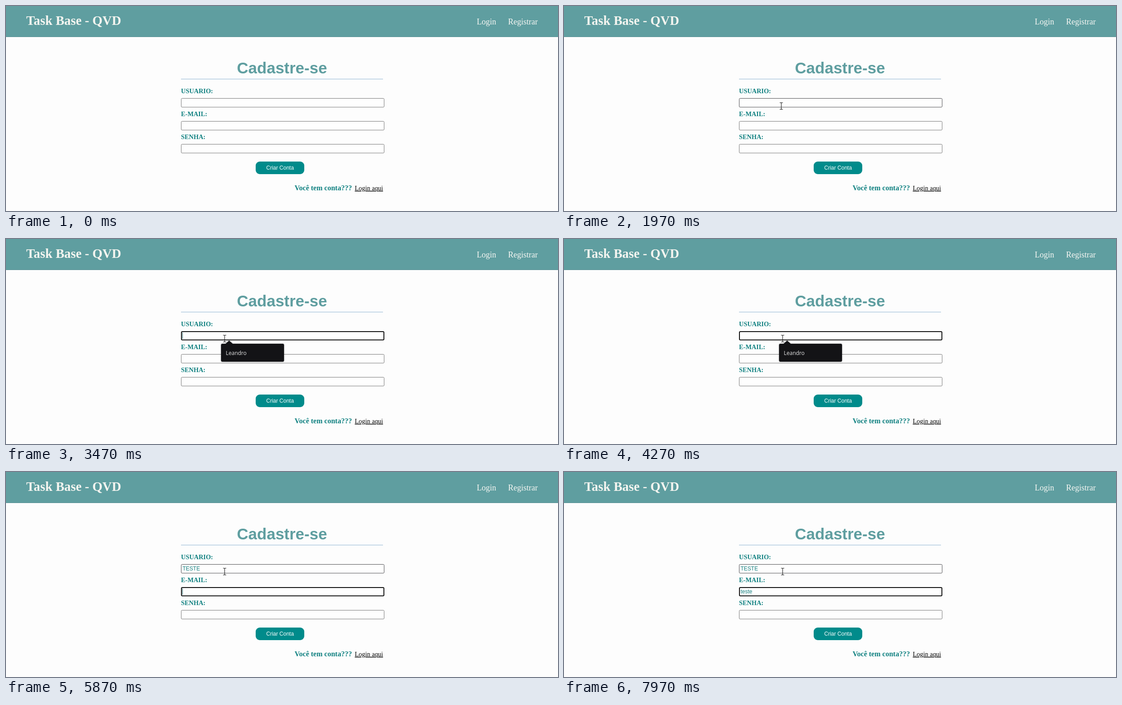
An HTML page that plays this animation: 1227 by 456 pixels, repeating every 8000 ms.

```html
<!DOCTYPE html>
<html lang="pt-BR">
<head>
<meta charset="utf-8">
<title>Cadastre-se</title>
<style>
  html, body { margin: 0; width: 100%; height: 100%; overflow: hidden; background: #fdfdfd; }
  svg { display: block; width: 1227px; height: 456px; }
  text { font-family: "Liberation Serif", "Times New Roman", serif; white-space: pre; }
  .sans { font-family: "Liberation Sans", Arial, sans-serif; }
  .bold { font-weight: bold; }
  .nav { font-size: 18px; fill: #f8f8f4; }
  .label { font-size: 14.4px; fill: #0f8080; }
  .value { font-size: 12px; fill: #178080; }
  .field { fill: #fefefe; }
</style>
</head>
<body>
<svg viewBox="0 0 1227 456">
  <rect width="1227" height="69" fill="#5f9ea0"/>
  <rect y="68" width="1227" height="1" fill="#548e92"/>
  <text class="bold" x="45" y="42" font-size="28.8" fill="#f5f5f0">Task Base - QVD</text>
  <text class="nav" x="1046.5" y="41">Login</text>
  <text class="nav" x="1116" y="41">Registrar</text>

  <text class="sans bold" x="613.5" y="150" font-size="35" fill="#5f9ea0" text-anchor="middle">Cadastre-se</text>
  <rect x="389" y="162" width="449" height="1" fill="#8fb4d2"/>
  <g id="form"></g>

  <rect x="555" y="346" width="108" height="28" rx="9" fill="#008b8b"/>
  <text class="sans" x="578.5" y="364" font-size="12" fill="#fff">Criar Conta</text>
  <text class="bold" x="641.5" y="410" font-size="16" fill="#0f8080">Você tem conta???</text>
  <text x="775.3" y="410" font-size="14.4" text-decoration="underline">Login aqui</text>

  <g id="tip">
    <path d="M481 233H488L496 226L504 233H615Q618 233 618 236V270Q618 273 615 273H481Q478 273 478 270V236Q478 233 481 233Z"
      fill="#131316" style="filter:drop-shadow(0 0 1.5px #0006)"/>
    <text x="488.5" y="258" font-size="12" fill="#e4e4e4" style="font-family:'Open Sans','Noto Sans',sans-serif">Leandro</text>
  </g>

  <g id="hand" fill="#fff" stroke="#111" stroke-width="1.1" stroke-linejoin="round">
    <path d="M-2 10.5V-8Q-2 -10 -.5 -10T1 -8V-2Q3.5 -3.5 4 -1Q6 -2 6.7 .2Q9 -.5 9 2V5Q9 8 7 10.5H-2L-7 3.5Q-8 1 -6 1Q-4.5 1 -2 4Z"/>
    <path d="M1 -2V2M4 -1V2M6.7 .2V3" fill="none"/>
  </g>
  <path id="arrow" d="M0 0V16L3.7 12.5L6.2 18L8.8 16.9L6.4 11.5H11.4Z" fill="#fff" stroke="#111"/>
  <path id="beam" d="M-3.5 -7.5H-1L0 -6.5L1 -7.5H3.5M0 -6.5V6.5M-3.5 7.5H-1L0 6.5L1 7.5H3.5" fill="none" stroke="#111" stroke-width="1.1"/>
</svg>
<script>
const LOOP = 8000;
const $ = id => document.getElementById(id);
const clamp = v => Math.max(0, Math.min(1, v));

// focus: [start, end]; keys: time of each typed character
const fields = [
  { label: 'USUARIO:', text: 'TESTE', focus: [2300, 5600], keys: [4410, 4560, 4690, 4810, 4950] },
  { label: 'E-MAIL:', text: 'teste', focus: [5600, LOOP], keys: [6720, 6870, 7000, 7130, 7280] },
  { label: 'SENHA:', text: '', focus: [LOOP, LOOP], keys: [] }
];

$('form').innerHTML = fields.map((f, i) => `
  <g transform="translate(0 ${i * 51})">
    <text class="label bold" x="389" y="194">${f.label}</text>
    <rect class="field" rx="2"/>
    <text class="value sans" x="392.5" y="219"></text>
    <rect class="caret" y="208" width="1" height="14" fill="#28686c"/>
  </g>`).join('');

fields.forEach((f, i) => {
  const row = $('form').children[i];
  f.box = row.querySelector('.field');
  f.value = row.querySelector('.value');
  f.caret = row.querySelector('.caret');
});

// pointer path: time, x, y
const path = [[30, 1148, 37], [560, 1148, 37], [830, 730, 46], [1100, 560, 150],
  [1450, 483, 222.5], [2050, 483, 222.5], [2200, 486, 221.5], [LOOP, 486, 221.5]];

function pointerAt(t) {
  const n = Math.max(1, path.findIndex(p => p[0] > t));
  const [a, b] = [path[n - 1], path[n]];
  const k = clamp((t - a[0]) / (b[0] - a[0]));
  return [1, 2].map(j => a[j] + (b[j] - a[j]) * k);
}

function set(el, attrs) {
  for (const name in attrs) el.setAttribute(name, attrs[name]);
}

function drawField(f, t, hover) {
  const focused = t >= f.focus[0] && t < f.focus[1];
  const typed = f.keys.filter(k => k <= t);
  f.value.textContent = f.text.slice(0, typed.length);
  set(f.box, focused
    ? { x: 390, y: 206, width: 450, height: 18.5, stroke: '#101010', 'stroke-width': 2 }
    : { x: 389.5, y: 205.5, width: 451, height: 19.5, stroke: hover ? '#4c4c50' : '#767676', 'stroke-width': 1 });
  const since = t - Math.max(f.focus[0], ...typed);
  const width = typed.length ? f.value.getComputedTextLength() : 0;
  set(f.caret, { x: Math.round(392.4 + width), opacity: focused && since % 1000 < 500 ? 1 : 0 });
}

function draw(t) {
  const [x, y] = pointerAt(t);
  fields.forEach((f, i) => {
    const top = 205 + 51 * i;
    drawField(f, t, x > 389 && x < 841 && y > top && y < top + 21);
  });

  const shown = clamp((t - 2400) / 150) * (1 - clamp((t - 4490) / 150));
  const scale = 0.95 + 0.05 * shown;
  set($('tip'), { opacity: shown, transform: `translate(548 253) scale(${scale}) translate(-548 -253)` });

  const shape = t < 30 ? '' : t < 870 ? 'hand' : t < 1400 ? 'arrow' : 'beam';
  for (const id of ['hand', 'arrow', 'beam'])
    set($(id), { opacity: id === shape ? 1 : 0, transform: `translate(${x} ${y})` });
}

const start = performance.now();
function frame() {
  draw((performance.now() - start) % LOOP);
  requestAnimationFrame(frame);
}
frame();
</script>
</body>
</html>
```
